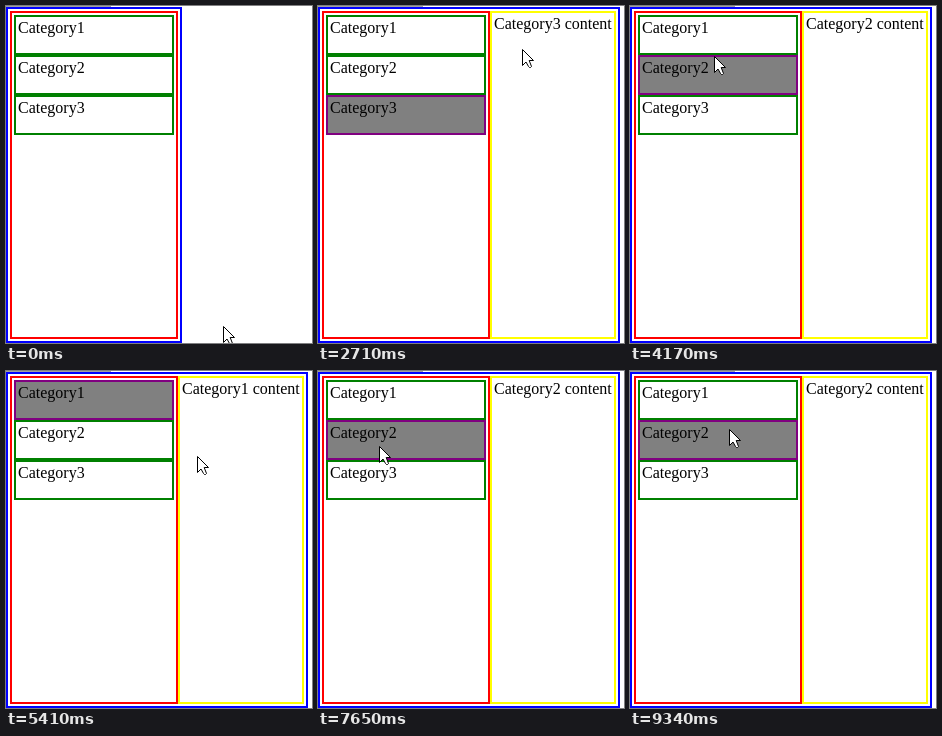
These frames come from a looping animation (306x337 px, 9420 ms). An HTML page with a canvas:

```html
<!DOCTYPE html>
<html lang="en">
<head>
<meta charset="utf-8">
<title>Category menu</title>
<style>
  html, body { margin: 0; width: 100%; height: 100%; overflow: hidden; background: #fff; }
  canvas { display: block; }
</style>
</head>
<body>
<canvas id="stage" width="306" height="337"></canvas>
<script>
const ctx = document.getElementById('stage').getContext('2d', { alpha: false });
const LOOP = 9420, STEP = 76;
const menu = { x: 8, y: 9, width: 160, rowHeight: 40, rows: 3 };

const home = { x: 217, y: 320 };
// A bend makes the pointer set off towards that height before it turns.
const moves = [
  { start: 70, end: 460, x: 28, y: 103 },
  { start: 610, end: 840, x: 57, y: 103 },
  { start: 1160, end: 1700, x: 204, y: 40 },
  { start: 2710, end: 3480, x: 77, y: 116, bend: 116 },
  { start: 3780, end: 4420, x: 86, y: 27 },
  { start: 4790, end: 5410, x: 191, y: 85 },
  { start: 6260, end: 7110, x: 59, y: 46, bend: 10 },
  { start: 7190, end: 7420, x: 59, y: 76 },
  { start: 7650, end: 8650, x: 192, y: 29 },
  { start: 9110, end: 9340, x: 99, y: 58, bend: 58 }
];

const arrow = new Path2D('M.5 .5V16.5L4 13L6.5 17.5L7.5 18.5H8.5L9.5 17.5L7.2 11.5H11.5Z');

const ease = s => s * s * (3 - 2 * s);
const mix = (a, b, t) => a + (b - a) * t;
const curve = (a, b, c, t) => mix(mix(a, b, t), mix(b, c, t), t);

function pointOn(from, move, t) {
  if (move.bend === undefined) {
    return { x: mix(from.x, move.x, t), y: mix(from.y, move.y, t) };
  }
  return { x: curve(from.x, from.x, move.x, t), y: curve(from.y, move.bend, move.y, t) };
}

function rowAt({ x, y }) {
  const row = Math.floor((y - menu.y) / menu.rowHeight) + 1;
  const inside = x >= menu.x && x < menu.x + menu.width && row >= 1 && row <= menu.rows;
  return inside ? row : 0;
}

// A row opens when the pointer enters it, unless it is heading for the content.
function nextActive(active, from, to) {
  const headingRight = to.x - from.x > Math.abs(to.y - from.y);
  return headingRight ? active : rowAt(to) || active;
}

function buildTimeline() {
  const states = [{ time: 0, pos: home, active: 0 }];
  let from = home;
  for (const move of moves) {
    const steps = Math.round((move.end - move.start) / STEP) + 1;
    for (let i = 1; i <= steps; i++) {
      const last = states[states.length - 1];
      const pos = pointOn(from, move, ease(i / steps));
      const active = nextActive(last.active, last.pos, pos);
      states.push({ time: move.start + (i - 1) * STEP, pos, active });
    }
    from = move;
  }
  return states;
}

function box(x, y, width, height, color) {
  ctx.strokeStyle = color;
  ctx.lineWidth = 2;
  ctx.strokeRect(x + 1, y + 1, width - 2, height - 2);
}

function fill(x, y, width, height, color) {
  ctx.fillStyle = color;
  ctx.fillRect(x, y, width, height);
}

function label(text, x, baseline) {
  ctx.fillStyle = '#000';
  ctx.fillText(text, x, baseline);
}

function drawMenu(active) {
  box(0, 1, active ? 302 : 176, 336, '#00f');
  box(4, 5, 168, 328, '#f00');
  for (let row = 1; row <= menu.rows; row++) {
    const y = menu.y + (row - 1) * menu.rowHeight;
    const selected = row === active;
    fill(menu.x, y, menu.width, menu.rowHeight, selected ? '#808080' : '#fff');
    box(menu.x, y, menu.width, menu.rowHeight, selected ? '#800080' : '#008000');
    label('Category' + row, 12, y + 18);
  }
  if (active) {
    box(172, 5, 126, 328, '#ff0');
    label(`Category${active} content`, 176, 23);
  }
}

function isOverText(pos) {
  const inRow = (pos.y - menu.y) % menu.rowHeight;
  return rowAt(pos) > 0 && pos.x >= 12 && pos.x <= 72 && inRow >= 4 && inRow <= 22.5;
}

function drawPointer(pos) {
  ctx.save();
  ctx.translate(Math.round(pos.x), Math.round(pos.y));
  if (isOverText(pos)) {
    // The text cursor inverts whatever lies below it.
    ctx.globalCompositeOperation = 'difference';
    fill(0, -7, 1, 14, '#fff');
    for (const y of [-8, 7]) {
      fill(-3, y, 3, 1, '#fff');
      fill(1, y, 3, 1, '#fff');
    }
  } else {
    ctx.fillStyle = '#fff';
    ctx.strokeStyle = '#000';
    ctx.lineWidth = 1;
    ctx.fill(arrow);
    ctx.stroke(arrow);
  }
  ctx.restore();
}

const timeline = buildTimeline();

function draw(time) {
  const { pos, active } = timeline.filter(state => state.time <= time).pop();
  fill(0, 0, 306, 337, '#fff');
  fill(0, 0, 105, 1, '#a0a0a0');
  ctx.font = '16px "Liberation Serif", "Times New Roman", serif';
  ctx.fontKerning = 'none';
  drawMenu(active);
  drawPointer(pos);
}

const origin = performance.now();
function tick() {
  draw((performance.now() - origin) % LOOP);
  requestAnimationFrame(tick);
}
tick();
</script>
</body>
</html>
```
